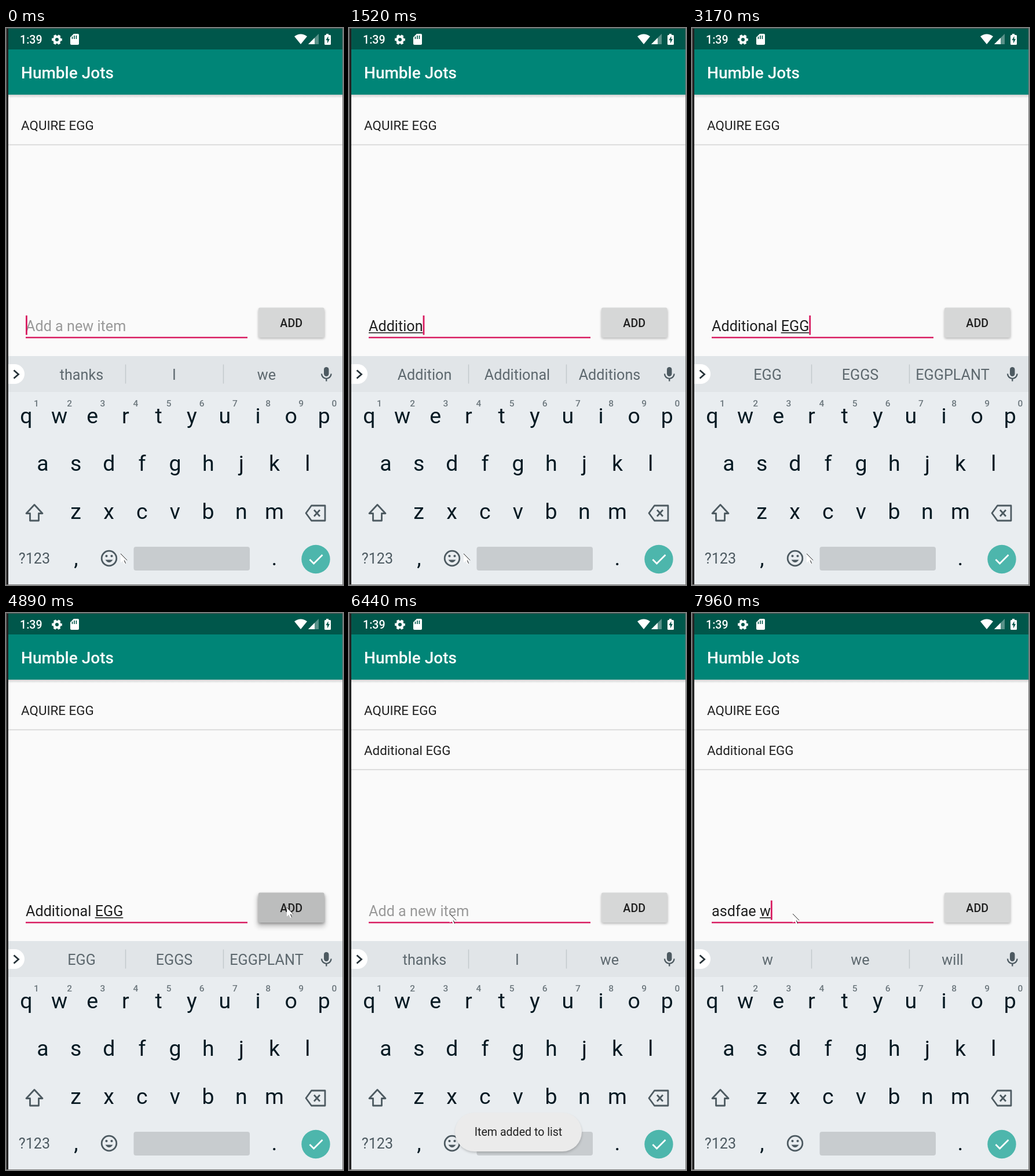
Write an HTML page that moves like this. It is 582 px wide and 961 px high and loops after 8 s.

```html
<!DOCTYPE html>
<html lang="en">
<head>
<meta charset="utf-8">
<title>To-do list</title>
<style>
  html, body { margin: 0; width: 100%; height: 100%; overflow: hidden; background: #fafafa; }
  svg { display: block; width: 582px; height: 961px; font-family: Roboto, "Noto Sans", sans-serif; }
  text { white-space: pre; }
  .mid { text-anchor: middle; }
  .item { font-size: 22.4px; fill: #202020; }
  .field { font-size: 25.2px; }
  .hint { fill: #999; }
  .word { font-size: 25.2px; fill: #5d686e; }
  .key { font-size: 37.5px; fill: #061a23; }
  .digit { font-size: 15.5px; font-weight: 500; fill: #6c777d; }
  .icon { fill: none; stroke: #4d5a61; stroke-width: 2.8; }
</style>
</head>
<body>
<svg viewBox="0 0 582 961">
  <defs>
    <linearGradient id="fall" x2="0" y2="1">
      <stop offset="0" stop-color="#000" stop-opacity=".17"/>
      <stop offset="1" stop-color="#000" stop-opacity="0"/>
    </linearGradient>
    <filter id="soft" x="-20%" y="-40%" width="140%" height="180%"><feGaussianBlur stdDeviation="2"/></filter>
    <filter id="softer" x="-20%" y="-40%" width="140%" height="180%"><feGaussianBlur stdDeviation="4"/></filter>
  </defs>

  <rect width="582" height="961" fill="#fafafa"/>
  <rect width="582" height="37" fill="#00574b"/>
  <rect y="37" width="582" height="78" fill="#008577"/>
  <rect y="115" width="582" height="6" fill="url(#fall)"/>

  <!-- status bar -->
  <g fill="#fff">
    <text x="24" y="27" font-size="19.6" font-weight="500">1:39</text>
    <circle cx="88" cy="20" r="5" fill="none" stroke="#fff" stroke-width="4"/>
    <circle cx="88" cy="20" r="7.6" fill="none" stroke="#fff" stroke-width="2.6" stroke-dasharray="4.4 3.56" stroke-dashoffset="2.2"/>
    <path d="M117 10h7q2 0 2 2v15q0 2-2 2h-11q-2 0-2-2v-11z"/>
    <path d="M114.5 15v4M118 13v6M121.500 13v6" stroke="#00574b" stroke-width="1.6"/>
    <path d="M498 14.500Q509 6.500 520 14.500L509 28z"/>
    <path d="M540 10v18h-18z" opacity=".35"/>
    <path d="M533 17v11h-11z"/>
    <path d="M553 12v-2h4v2h2.500q1.500 0 1.500 1.500v14q0 1.500-1.500 1.500h-8q-1.500 0-1.500-1.500v-14q0-1.500 1.500-1.500z"/>
    <path d="M556.500 14l-4 7h2.500v5.500l4-7.500h-2.500z" fill="#00574b"/>
    <text x="26" y="86.500" font-size="28" font-weight="500">Humble Jots</text>
  </g>

  <!-- list -->
  <text class="item" x="26" y="176">AQUIRE EGG</text>
  <rect x="4" y="200.700" width="577" height="1.600" fill="#d5d5d5"/>
  <g id="added">
    <text class="item" x="26" y="245">Additional EGG</text>
    <rect x="4" y="269.500" width="577" height="1.600" fill="#d5d5d5"/>
  </g>

  <!-- entry row -->
  <text id="typed" class="field" x="34" y="523"></text>
  <rect id="compose" y="525" height="1.600" fill="#202020"/>
  <rect x="34" y="532.800" width="383" height="2.500" fill="#d81b60"/>
  <rect id="caret" y="496" width="2.800" height="33.500" fill="#d81b60"/>
  <rect x="436" y="485" width="114" height="51" rx="3" opacity=".28" filter="url(#soft)"/>
  <rect id="lift" x="434" y="487" width="117" height="54" rx="4" filter="url(#softer)"/>
  <rect id="button" x="436" y="482.500" width="113.500" height="51.500" rx="2.500" fill="#d6d7d7"/>
  <text class="mid" x="492.700" y="516" font-size="19.600" font-weight="500" fill="#202020">ADD</text>

  <!-- keyboard -->
  <rect y="566" width="582" height="395" fill="#e9edf0"/>
  <rect y="566" width="582" height="62" fill="#e1e5e8"/>
  <path d="M206.500 580.500v33M375.500 580.500v33" stroke="#c3c9cc" stroke-width="1.500"/>
  <path d="M4 580h11a17 17 0 0 1 0 34H4z" fill="#fff"/>
  <path d="M13.500 590.500l8 7-8 7" class="icon" style="stroke:#263238"/>
  <g id="words"></g>
  <rect x="549" y="585" width="8.500" height="16" rx="4.200" fill="#4d5a61"/>
  <path d="M545 596.500a8.300 8.300 0 0 0 16.600 0M553.300 604.500v5" class="icon" style="stroke-width:2.300"/>
  <g id="keys"></g>
  <path d="M49 822.500L35 837.500h6.500v12.500h15v-12.500H63z" class="icon" stroke-linejoin="round"/>
  <path d="M527.500 824h23.500v26h-23.500l-9.500-13zM532 831.500l10 11M542 831.500l-10 11" class="icon" stroke-linejoin="round"/>
  <text class="mid" x="49" y="924" font-size="25.200" fill="#4d5a61">?123</text>
  <circle cx="178" cy="915" r="12.800" class="icon"/>
  <path d="M171.500 917.500q6.500 9 13 0z" fill="#4d5a61"/>
  <circle cx="173.500" cy="911" r="2.100" fill="#4d5a61"/>
  <circle cx="182.500" cy="911" r="2.100" fill="#4d5a61"/>
  <rect x="220.500" y="895" width="200.500" height="41" rx="4" fill="#c8cccf"/>
  <circle cx="535" cy="916.500" r="24.700" fill="#4db6ac"/>
  <path d="M524.500 917l7 7 15-15" fill="none" stroke="#fff" stroke-width="2.800"/>

  <g id="toast">
    <rect x="184" y="865" width="218" height="66" rx="33" opacity=".2" filter="url(#soft)"/>
    <rect x="183" y="862" width="219" height="67" rx="33.500" fill="#ebebeb"/>
    <text class="mid" x="292.500" y="902" font-size="19.600" fill="#202020">Item added to list</text>
  </g>

  <!-- window edge -->
  <rect width="4" height="961" fill="#222"/>
  <rect width="1" height="961" fill="#666"/>
  <rect width="582" height="1" fill="#555"/>
  <rect x="581" width="1" height="961" fill="#777"/>
  <rect y="960" width="582" height="1" fill="#777"/>

  <g id="pointer">
    <path d="M0 0v15.500l3.500-3 2.500 5.500 2.500-1.200-2.300-5.300h5z" fill="#fff"/>
    <path d="M0 0L11 11.300M6.200 11.500l2.300 5.300" fill="none" stroke="#222" stroke-width="1"/>
  </g>
</svg>
<script>
const LOOP = 8000;
const LEFT = 34;
const $ = id => document.getElementById(id);

// time, typed text, three suggestions
const typing = [
  [0, '', 'thanks I we'],
  [310, 'A', 'A As And'],
  [710, 'Ad', 'Ad Add And'],
  [850, 'Add', 'Add Address Added'],
  [980, 'Addi', 'Addi Additional Adding'],
  [1100, 'Addit', 'Addit Additional Addition'],
  [1230, 'Additi', 'Additi Additional Addition'],
  [1370, 'Additio', 'Additio Additional Additionally'],
  [1500, 'Addition', 'Addition Additional Additions'],
  [1640, 'Additional', 'Additional Addition Additions'],
  [1800, 'Additional ', 'and info details'],
  [2230, 'Additional E', 'E Email Expenses'],
  [2350, 'Additional Eg', 'Eg Egg Eggs'],
  [2910, 'Additional E', 'E Email Expenses'],
  [3040, 'Additional EG', 'EG EGG EGGS'],
  [3170, 'Additional EGG', 'EGG EGGS EGGPLANT'],
  [5040, '', 'thanks I we'],
  [6830, 'a', 'a and as'],
  [6970, 'as', 'as ask well'],
  [7110, 'asd', 'asd add said'],
  [7250, 'asdf', 'asdf add said'],
  [7390, 'asdfa', 'asdfa Sofa said'],
  [7520, 'asdfae', 'asdfae safe sofas'],
  [7800, 'asdfae ', 'to and the'],
  [7960, 'asdfae w', 'w we will']
];
const caretSteps = [[0, 1], [3700, 0], [4240, 1], [4650, 0], [5040, 1], [5440, 0], [6010, 1], [6440, 0], [6830, 1]];
const pressSteps = [[0, 0], [4780, .5], [4890, 1], [5040, .6], [5170, .25], [5310, 0]];
const toastSteps = [[0, 0], [5170, .45], [5310, .9], [5440, 1], [7250, .6], [7390, 0]];
const pointerSteps = [
  [0, 198, 907], [3840, 235, 872], [3970, 310, 785], [4110, 390, 665], [4240, 458, 560], [4380, 485, 508],
  [5310, 430, 514], [5440, 300, 523], [5580, 192, 522], [5730, 187, 521], [5870, 179, 520], [6010, 174, 519]
];

const at = (steps, t) => steps.findLast(s => s[0] <= t);

function addText(parent, cls, x, y, str = '') {
  const el = document.createElementNS('http://www.w3.org/2000/svg', 'text');
  el.setAttribute('class', 'mid ' + cls);
  el.setAttribute('x', x);
  el.setAttribute('y', y);
  el.textContent = str;
  parent.append(el);
  return el;
}

const PITCH = 57.15;
[['qwertyuiop', 35, 682], ['asdfghjkl', 63.5, 764], ['zxcvbnm', 120.5, 847], [',', 121, 927], ['.', 463.5, 927]]
  .forEach(([row, x, y]) => [...row].forEach((c, i) => addText($('keys'), 'key', x + i * PITCH, y, c)));
[...'1234567890'].forEach((c, i) => addText($('keys'), 'digit', 52.5 + i * PITCH, 653, c));
const words = [130.5, 290.5, 450].map(x => addText($('words'), 'word', x, 606.5));

const pen = document.createElement('canvas').getContext('2d');
const widthOf = str => {
  pen.font = '25.2px Roboto, "Noto Sans", sans-serif';
  return pen.measureText(str).width;
};

let shown;
function showText(step) {
  if (step === shown) return;
  shown = step;
  const [, text, suggestions] = step;
  const start = text.lastIndexOf(' ') + 1;
  const from = widthOf(text.slice(0, start));
  const end = widthOf(text);
  $('typed').textContent = text || 'Add a new item';
  $('typed').setAttribute('class', text ? 'field' : 'field hint');
  $('typed').setAttribute('fill', '#202020');
  $('compose').setAttribute('x', LEFT + from);
  $('compose').setAttribute('width', Math.max(0, end - from));
  $('caret').setAttribute('x', LEFT + end);
  suggestions.split(' ').forEach((w, i) => words[i].textContent = w);
}

function draw(t) {
  showText(at(typing, t));
  $('caret').setAttribute('opacity', at(caretSteps, t)[1]);
  $('added').setAttribute('opacity', t >= 5040 ? 1 : 0);
  $('toast').setAttribute('opacity', at(toastSteps, t)[1]);
  const press = at(pressSteps, t)[1];
  const grey = Math.round(214 - 26 * press);
  $('button').setAttribute('fill', `rgb(${grey},${grey + 1},${grey + 1})`);
  $('lift').setAttribute('opacity', .22 * press);
  const [, x, y] = at(pointerSteps, t);
  $('pointer').setAttribute('transform', `translate(${x} ${y})`);
}

const began = performance.now();
function tick() {
  draw((performance.now() - began) % LOOP);
  requestAnimationFrame(tick);
}
tick();
</script>
</body>
</html>
```
